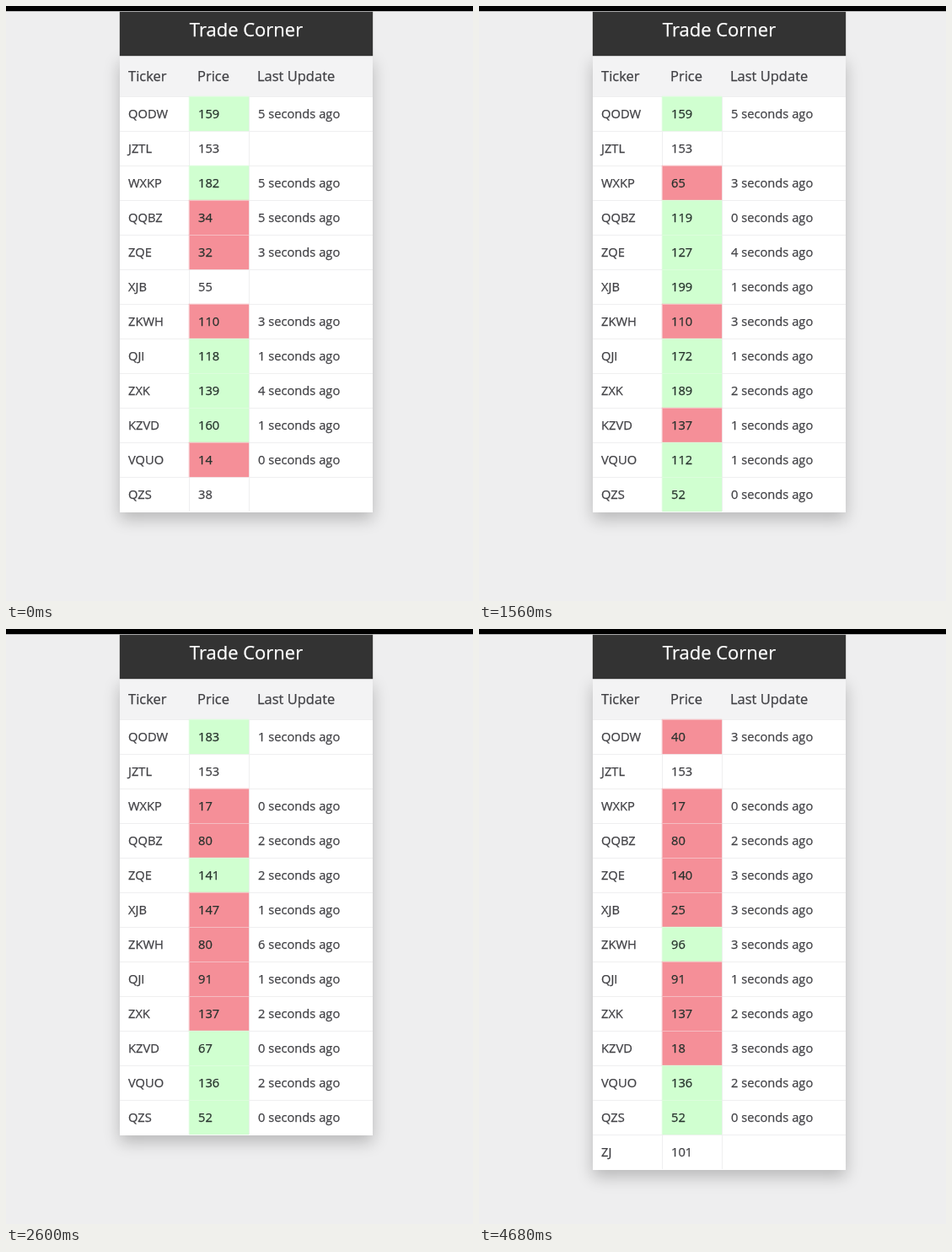
An HTML page that plays this animation: 554 by 705 pixels, repeating every 5200 ms.

```html
<!DOCTYPE html>
<html lang="en">
<head>
<meta charset="utf-8">
<title>Stock table</title>
<style>
html, body { margin: 0; width: 100%; height: 100%; overflow: hidden; }
body {
  background: #eeeeef; color: #414145;
  font: 14.7px "Open Sans", "Noto Sans", sans-serif; -webkit-text-stroke: .25px;
}
/* One-pixel shadows in the fill colour soften the edges. */
#bar {
  position: absolute; left: 0; top: 0; width: 100%; height: 6px;
  background: #000; box-shadow: 0 0 1px #000;
}
#title {
  position: absolute; left: 135px; top: 7px; width: 300px; height: 52px;
  background: #333; box-shadow: 0 0 1px #333;
  color: #fff; font-size: 22px; line-height: 40px; text-align: center;
}
#table {
  position: absolute; left: 135px; top: 59px; width: 300px; padding-bottom: 1px;
  background: #fff; box-shadow: 0 8px 18px rgba(0, 0, 0, .23);
}
.row { display: grid; grid-template-columns: 82px 71px 147px; height: 41px; line-height: 39px; }
.row > * {
  box-sizing: border-box; padding-left: 10px; white-space: pre;
  border: solid #efeff0; border-width: 1px 0 0 1px; background-clip: padding-box;
}
.row > :first-child { border-left: 0; }
.row .up, .row .down {
  position: relative; color: #26312c;
  background-color: var(--fill); border-color: var(--edge); box-shadow: 0 0 1px var(--fill);
}
.row .up { --fill: #d0ffd0; --edge: #dcfddc; }
.row .down { --fill: #f58f98; --edge: #f5bcc1; }
.head { height: 48px; line-height: 46px; background: #f3f3f4; font-size: 16.5px; }
.head > * { border-color: transparent; padding-left: 9px; }
.head > :first-child { padding-left: 10px; }
</style>
</head>
<body>
<div id="table">
  <div class="row head"><span>Ticker</span><span>Price</span><span>Last Update</span></div>
  <div id="rows"></div>
</div>
<div id="title">Trade Corner</div>
<div id="bar"></div>
<script>
const LOOP = 5200;

// Each entry: ticker, price (+ rose, - fell, unsigned is new), seconds since the last update.
const updates = [
  [0, "QODW +159 5, JZTL 153, WXKP +182 5, QQBZ -34 5, ZQE -32 3, XJB 55, " +
      "ZKWH -110 3, QJI +118 1, ZXK +139 4, KZVD +160 1, VQUO -14 0, QZS 38"],
  [910, "QQBZ +119 0, XJB +83 7, QJI -163 0, ZXK +189 2, KZVD +184 2, VQUO +43 2, QZS +52 0"],
  [1560, "WXKP -65 3, ZQE +127 4, XJB +199 1, QJI +172 1, KZVD -137 1, VQUO +112 1"],
  [2210, "QODW -156 5, WXKP -17 0, QQBZ -80 2, XJB -147 1, ZKWH -80 6, QJI -91 1, ZXK -137 2"],
  [2470, "QODW +183 1, ZQE +141 2, KZVD +67 0, VQUO +136 2"],
  [3900, "QODW -40 3, ZQE -140 3, XJB -25 3, ZKWH +96 3, KZVD -18 3, ZJ 101"],
];
const trend = { "+": "up", "-": "down" };
const rows = document.getElementById("rows");

function renderRow([ticker, price, age]) {
  const text = age ? `${age} seconds ago` : "";
  return `<div class="row"><span>${ticker}</span>` +
    `<span class="${trend[price[0]] || ""}">${price.replace(/[+-]/, "")}</span><span>${text}</span></div>`;
}

let shown = -1;
function draw() {
  const time = performance.now() % LOOP;
  const past = updates.filter(([start]) => start <= time);
  if (past.length !== shown) {
    shown = past.length;
    const stocks = new Map();
    for (const [, list] of past)
      for (const entry of list.split(", ")) {
        const fields = entry.split(" ");
        stocks.set(fields[0], fields);
      }
    rows.innerHTML = [...stocks.values()].map(renderRow).join("");
  }
  requestAnimationFrame(draw);
}
draw();
</script>
</body>
</html>
```
